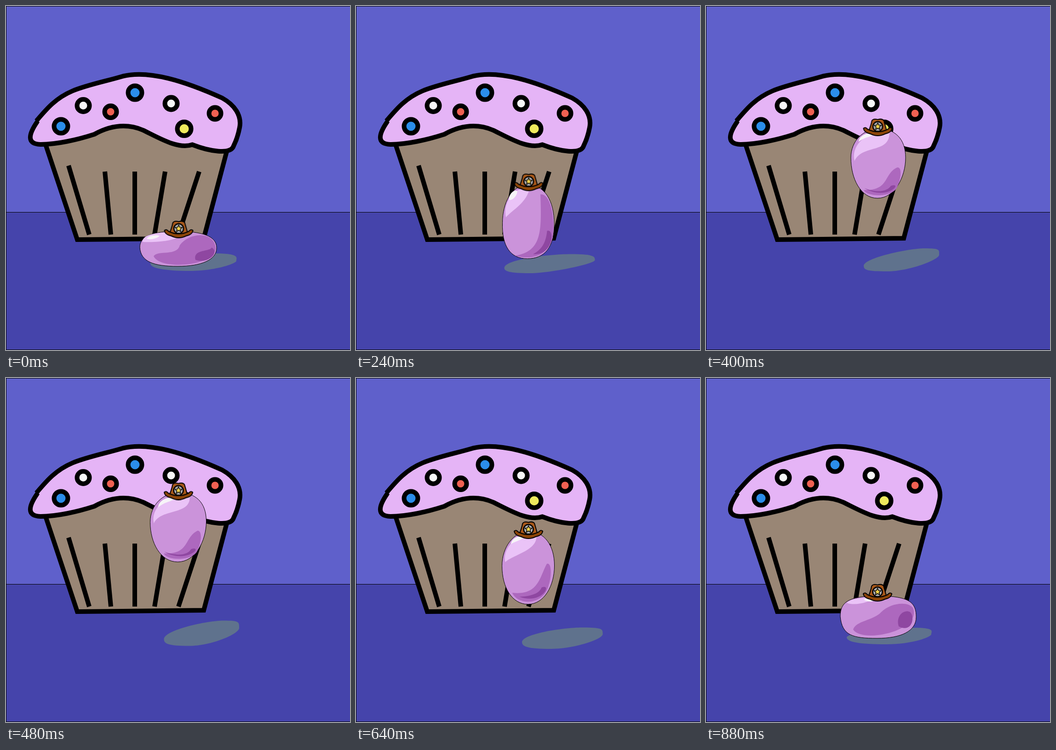
An HTML page without scripts that plays this animation: 748x748 px, repeating every 0.96 s.

```html
<!DOCTYPE html>
<html lang="en">
<head>
<meta charset="utf-8">
<title>Bouncing jelly bean</title>
<style>
html, body { margin: 0; width: 100%; height: 100%; overflow: hidden; background: #4544ab; }
svg { display: block; width: 100vw; height: 100vh; }

.muffin { stroke: #000; stroke-width: 10; fill: none; }

/* Key poses sit one or two 80 ms ticks apart; steps(2) fills in the in-between pose. */
.pose { animation: 960ms steps(2) infinite; }
.shadow { fill: #5f728d; animation-name: shadow; }
.skin { fill: #cb93da; stroke: #000; animation-name: skin; }
.light { fill: #eac3f7; animation-name: light; }
.gloss { fill: #f7f4f8; animation-name: gloss; }
.dark { fill: #ad68be; animation-name: dark; }
.deep { fill: #8f47a1; animation-name: deep; }
.hat { animation-name: hat; stroke: #000; stroke-width: 2; stroke-linejoin: round; }
.bean { animation: apex 960ms steps(1) infinite; }

@keyframes apex {
  0%, 58.333%, 100% { transform: none; }
  50% { transform: translateY(-18px); }
}
@keyframes shadow {
  0%, 100% { d: path("M314,560C314,550 400,538 455,538S501,548 501,554S455,576 400,576S314,570 314,560Z"); }
  16.666% { d: path("M323,570C323,550 380,542 440,542S497,548 497,560S450,586 405,586S323,580 323,570Z"); }
  33.333% { d: path("M322,569C322,553 455,537 495,537S542,541 542,545S395,576 350,576S322,573 322,569Z"); animation-timing-function: steps(1); }
  41.666% { d: path("M343,565C343,548 440,527 475,527S507,530 507,541S440,577 395,577S343,574 343,565Z"); }
  58.333% { d: path("M344,571C344,548 435,528 470,528S507,530 507,546S450,588 403,588S344,582 344,571Z"); }
  75% { d: path("M378,578C378,566 460,557 515,557S566,562 566,568S500,590 445,590S378,586 378,578Z"); }
  91.666% { d: path("M306,564C306,555 400,543 450,543S490,551 490,557S450,579 392,579S306,574 306,564Z"); animation-timing-function: steps(1); }
}
@keyframes skin {
  0%, 100% { d: path("M291,525C291,500 318,490 372,490S458,500 458,526S425,566 373,566S293,556 291,525Z"); }
  16.666% { d: path("M310,503C310,472 340,447 375,447S439,470 439,508S408,566 368,566S310,535 310,503Z"); }
  33.333% { d: path("M327,440C327,385 336,331 373,331S423,376 423,440S412,533 377,533S324,508 327,440Z"); animation-timing-function: steps(1); }
  41.666% { d: path("M315,330C315,293 342,267 376,267S434,288 434,330S410,418 373,418S315,375 315,330Z"); }
  58.333% { d: path("M312,333C312,295 340,268 376,268S437,286 437,330S412,418 374,418S312,378 312,333Z"); }
  75% { d: path("M323,484C323,440 345,400 376,400S426,442 426,486S406,566 374,566S323,532 323,484Z"); }
  91.666% { d: path("M292,519C292,490 305,474 375,474S457,490 457,520S425,566 372,566S296,560 292,519Z"); animation-timing-function: steps(1); }
}
@keyframes light {
  0%, 100% { d: path("M297,513C295,492 350,490 392,492C370,512 330,514 297,513Z"); }
  16.666% { d: path("M316,500C314,470 345,448 380,452C370,480 335,505 316,500Z"); }
  33.333% { d: path("M336,419C325,390 334,340 376,337C374,375 347,380 336,419Z"); animation-timing-function: steps(1); }
  41.666% { d: path("M323,337C315,305 345,270 399,274C400,322 340,300 323,337Z"); }
  58.333% { d: path("M320,331C314,300 345,270 400,274C406,314 335,300 320,331Z"); }
  75% { d: path("M329,470C323,445 345,402 384,412C386,435 345,470 329,470Z"); }
  91.666% { d: path("M306,489C312,481 335,478 372,475C355,488 325,496 306,489Z"); animation-timing-function: steps(1); }
}
@keyframes gloss {
  0%, 100% { d: path("M306,506C310,498 330,497 334,500C328,506 312,509 306,506Z"); }
  16.666% { d: path("M323,487C323,470 335,463 339,467C342,475 332,490 323,487Z"); }
  33.333% { d: path("M342,356C342,345 352,335 362,337C362,345 350,358 342,356Z"); animation-timing-function: steps(1); }
  41.666% { d: path("M332,295C332,282 352,273 370,276C360,286 348,283 332,295Z"); }
  58.333% { d: path("M330,304C330,288 350,276 372,280C360,290 345,288 330,304Z"); }
  75% { d: path("M343,418C348,408 358,405 366,409C360,416 352,420 343,418Z"); }
  91.666% { d: path("M343,482C350,477 362,478 366,484C360,487 350,487 343,482Z"); animation-timing-function: steps(1); }
}
@keyframes dark {
  0%, 100% { d: path("M321,544C330,530 372,545 378,520C400,490 455,490 456,528C452,566 335,575 321,544Z"); }
  16.666% { d: path("M347,562C400,548 425,510 413,469C436,480 442,515 436,542C415,562 375,567 347,562Z"); }
  33.333% { d: path("M343,524C410,520 382,470 389,350C410,335 424,400 420,465C414,535 380,536 343,524Z"); animation-timing-function: steps(1); }
  41.666% { d: path("M343,400C400,402 385,365 416,351C428,350 423,380 415,395C405,416 350,416 343,400Z"); }
  58.333% { d: path("M343,399C400,402 388,365 417,349C429,350 424,380 416,395C405,415 350,416 343,399Z"); }
  75% { d: path("M336,535C395,545 410,500 413,459C424,450 426,490 422,505C412,575 355,575 336,535Z"); }
  91.666% { d: path("M320,547C325,528 365,527 381,509C402,488 440,485 450,500C470,550 340,578 320,547Z"); animation-timing-function: steps(1); }
}
@keyframes deep {
  0%, 100% { d: path("M412,552C406,528 444,535 447,525C466,535 440,562 412,552Z"); }
  16.666% { d: path("M404,550C402,535 423,530 426,508C440,505 435,552 404,550Z"); }
  33.333% { d: path("M366,529C405,525 403,500 405,470C425,460 425,535 366,529Z"); animation-timing-function: steps(1); }
  41.666% { d: path("M344,396C375,408 395,402 402,391C430,382 395,425 344,396Z"); }
  58.333% { d: path("M343,395C375,406 397,402 403,389C432,381 395,423 343,395Z"); }
  75% { d: path("M367,556C370,545 400,540 404,522C424,510 415,565 367,556Z"); }
  91.666% { d: path("M419,540C412,518 430,502 444,509C456,522 446,555 419,540Z"); animation-timing-function: steps(1); }
}
@keyframes hat {
  0%, 100% { transform: translate(375.5px, 484px); }
  16.666% { transform: translate(376.5px, 442px); }
  33.333% { transform: translate(374.5px, 321px); animation-timing-function: steps(1); }
  41.666% { transform: translate(373.5px, 262px); }
  58.333% { transform: translate(376.5px, 263px); }
  75% { transform: translate(373.5px, 395px); }
  91.666% { transform: translate(373px, 465px); animation-timing-function: steps(1); }
}
</style>
</head>
<body>
<svg viewBox="0 0 748 748">
  <rect width="748" height="449" fill="#5f60cb"/>
  <rect y="449" width="748" height="299" fill="#4544ab"/>
  <path d="M0,448.5H748M0,.5H748M.5,0V748M0,747.5H748" stroke="#000"/>

  <g class="muffin">
    <path fill="#998675" d="M86,301L155,508L430,505L480,316L400,282L258,235L180,262"/>
    <path d="M136,347L181,497M215,360L228,497M280,360V497M346,360L323,497M420,360L375,497"/>
    <path fill="#e5b4f6" d="M66,250C88,224 108,200 145,184.500C178,171 218,163.500 253,153C310,138 390,164 470,200C497,215 513,238 508,264C505,280 501,292 495,304C489,324 442,316 405,301.500C375,312 335,288 298,270C265,256 230,258 192,279C155,291 110,301 75,301C45,300 48,280 69,250"/>
    <g fill="#2b8de9"><circle cx="119.5" cy="261.5" r="15"/><circle cx="280.5" cy="188.5" r="15"/></g>
    <g fill="#f7f7f7"><circle cx="168" cy="216.5" r="13.5"/><circle cx="359" cy="212" r="13.5"/></g>
    <g fill="#f06152"><circle cx="227.5" cy="230" r="13"/><circle cx="454.5" cy="233.5" r="13"/></g>
    <circle cx="387.5" cy="267" r="15" fill="#efea5c"/>
  </g>

  <path class="pose shadow"/>
  <g class="bean">
    <path class="pose skin"/>
    <path class="pose light"/>
    <path class="pose gloss"/>
    <path class="pose dark"/>
    <path class="pose deep"/>
    <g class="pose hat">
      <path fill="#a8581a" d="M-19,8Q-14,-5 -13,-12Q-10,-18 0,-15Q9,-18 13,-13Q16,-3 19,8Q0,16 -19,8Z"/>
      <path fill="#8c4508" d="M-31,4Q-27,0 -22,6Q0,17 22,6Q27,0 31,4Q30,13 16,16Q0,24 -16,16Q-30,13 -31,4Z"/>
      <circle r="10.5" fill="#a9a9ad" stroke-width="2.5"/>
      <path fill="#f8d64e" stroke-width="1.5" d="M0,-8L2.2,-2.8L7.6,-2.5L3.4,1.1L4.7,6.5L0,3.6L-4.7,6.5L-3.4,1.1L-7.6,-2.5L-2.2,-2.8Z"/>
    </g>
  </g>
</svg>
</body>
</html>
```
